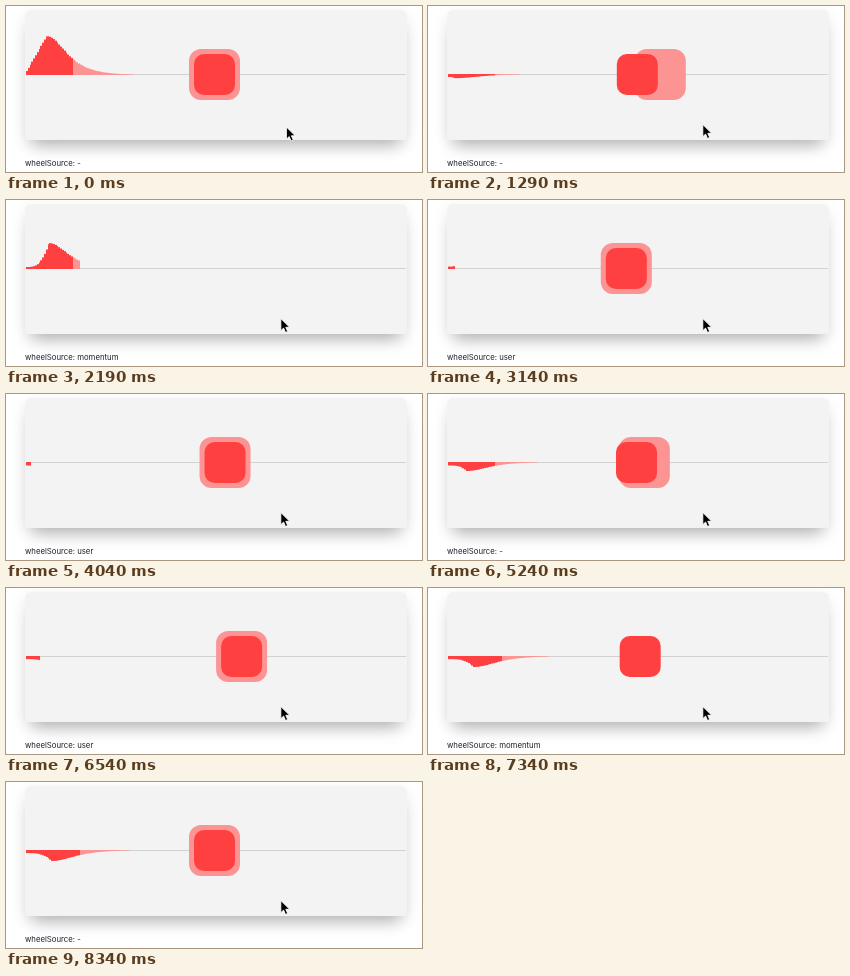
An HTML page with a canvas that plays this animation: 416x166 px, repeating every 8.39 s.

```html
<!DOCTYPE html>
<html lang="en">
<head>
<meta charset="utf-8">
<title>Wheel gestures</title>
<style>
html, body { margin: 0; width: 100%; height: 100%; overflow: hidden; background: #fff; }
.card {
  position: absolute; left: 19px; top: 4px; width: 382px; height: 130px;
  border-radius: 6px 6px 2px 2px; background: #f3f3f3;
  box-shadow: 0 12px 16px -7px rgba(0, 0, 0, .28), 0 3px 16px rgba(0, 0, 0, .07);
}
canvas { position: absolute; left: 0; top: 0; }
.label {
  position: absolute; left: 19px; top: 152px; white-space: pre;
  font: 7.75px/11px Inter, Roboto, sans-serif; color: #1a202c;
}
.cursor { position: absolute; left: 0; top: 0; overflow: visible; }
</style>
</head>
<body>
<div class="card"></div>
<canvas width="416" height="166"></canvas>
<div class="label"></div>
<svg class="cursor" width="10" height="15">
  <path d="M0 0V12.2L2.8 9.6L4.7 14L6.9 13L5 8.8H8.9Z" fill="#000" stroke="#fff" stroke-width=".9"/>
</svg>
<script>
const LOOP = 8390, EVENT = 1000 / 60, BAR = 1.8, REST = 50, FAINT = .4;
const AXIS = 68.5, LEFT = 20, HOME = 208.5;
const SOLID = '#ff4040', PALE = '#fd9494';

const sum = list => list.reduce((a, b) => a + b, 0);

// Wheel deltas rise from first to peak, then fade out; momentum takes over after user px
function gesture({ start, dir, first, peak, at, fade, user = 46, rise = 3 }) {
  const delta = x => x < at
    ? first + (peak - first) * (x / at) ** rise
    : peak / Math.cosh((x - at) / fade);
  const length = at + fade * Math.log(2 * peak / FAINT);
  const bars = Array.from({ length: Math.floor(length / BAR) }, (_, i) => delta(i * BAR));
  return { start, dir, bars, userBars: Math.round(user / BAR) };
}

const gestures = [
  { start: -2500, dir: -1, first: 4, peak: 39, at: 20, fade: 17, rise: 1 },
  { start: 390, dir: 1, first: 3, peak: 4.2, at: 6, fade: 22 },
  { start: 1700, dir: -1, first: 2, peak: 26, at: 22, fade: 17 },
  { start: 3082, dir: -1, first: 2.4, peak: 25, at: 20, fade: 17 },
  { start: 4000, dir: 1, first: 3.5, peak: 9, at: 18, fade: 19 },
  { start: 6415, dir: 1, first: 3.1, peak: 11, at: 25, fade: 20, user: 54 }
].map(gesture);

// Critically damped return to zero
function settle(ms) {
  const k = Math.max(0, ms) * .014;
  return (1 + k) * Math.exp(-k);
}

const ctx = document.querySelector('canvas').getContext('2d');
const label = document.querySelector('.label');
const cursor = document.querySelector('.cursor');

function square(offset, size, radius, color) {
  ctx.fillStyle = color;
  ctx.beginPath();
  ctx.roundRect(HOME + offset - size / 2, AXIS - size / 2, size, size, radius);
  ctx.fill();
}

function draw(t) {
  const { start, dir, bars, userBars } = gestures.filter(g => g.start <= t).pop();
  const age = t - start;
  const seen = bars.slice(0, Math.floor(age / EVENT) + 1);
  const userEnd = userBars * EVENT;
  const end = bars.length * EVENT + REST;

  ctx.clearRect(0, 0, 416, 166);
  ctx.fillStyle = '#d2d2d2';
  ctx.fillRect(LEFT, AXIS - .5, 380, 1);
  seen.forEach((h, i) => {
    const x = Math.round(i * BAR), w = Math.round((i + 1) * BAR) - x;
    ctx.fillStyle = i < userBars ? SOLID : PALE;
    ctx.fillRect(LEFT + x, AXIS - dir / 2, w, dir * h);
  });
  square(dir * sum(seen) * settle(age - end), 51, 12, PALE);
  square(dir * sum(seen.slice(0, userBars)) * settle(age - userEnd), 41, 10, SOLID);

  label.textContent = 'wheelSource: ' + (age < userEnd ? 'user' : age < end ? 'momentum' : '-');
  const p = Math.min(1, Math.max(0, (t - 60) / 240)), e = p * p * (3 - 2 * p);
  cursor.style.transform = `translate(${280.4 - 5.6 * e}px, ${121 - 2.5 * e}px)`;
}

const begin = performance.now();
function frame() {
  draw((performance.now() - begin) % LOOP);
  requestAnimationFrame(frame);
}
frame();
</script>
</body>
</html>
```
